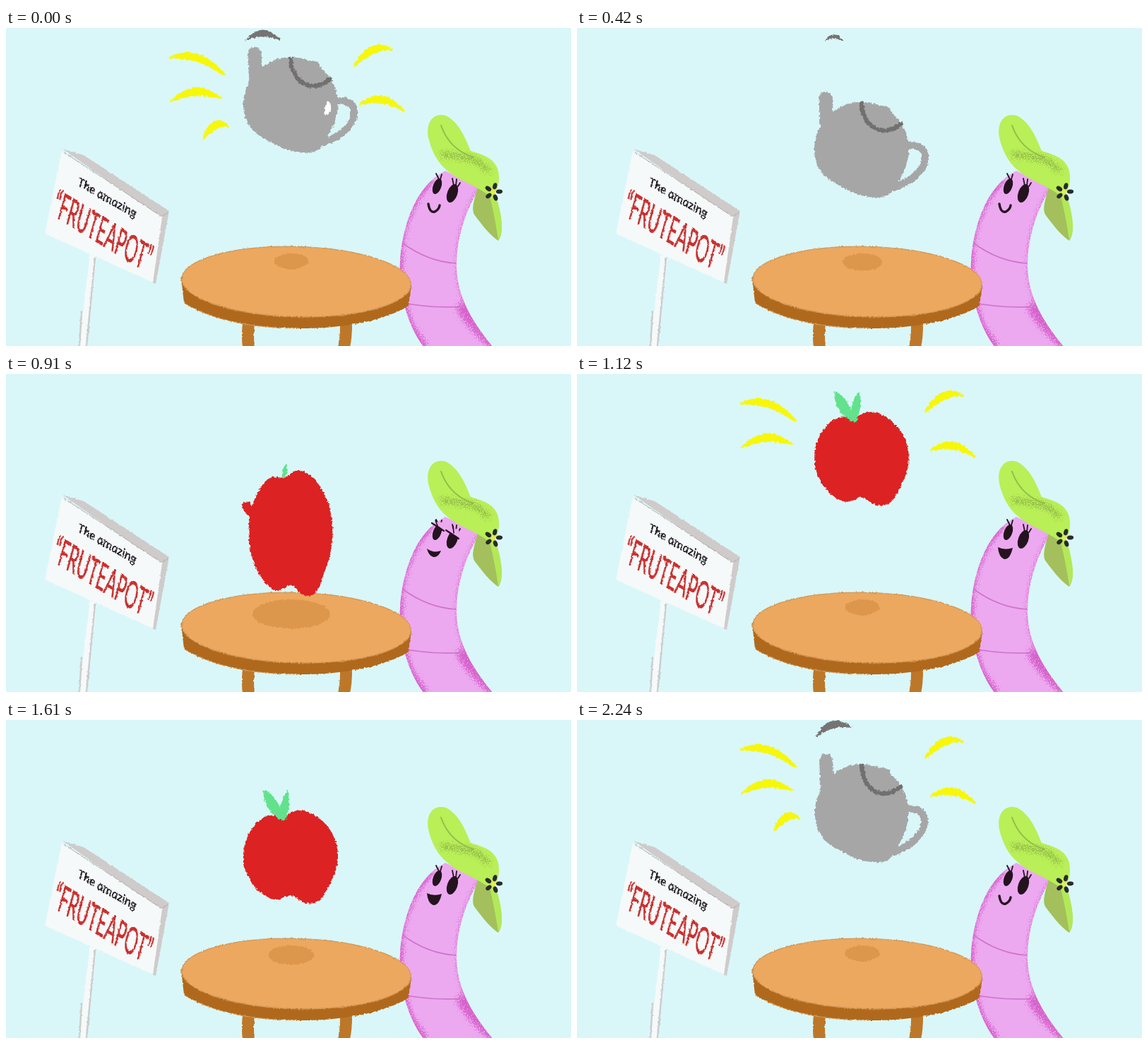
An HTML page that plays this animation: 800 px wide and 450 px high, repeating every 2310 ms.

```html
<!DOCTYPE html>
<html lang="en">
<head>
<meta charset="utf-8">
<title>The amazing Fruteapot</title>
<style>
html, body { margin: 0; width: 100%; height: 100%; overflow: hidden; background: #d9f7f9 }
svg { display: block; width: 100%; height: 100% }
text { font-family: Lato, "Open Sans", sans-serif }
.line { fill: none; stroke-linecap: round; stroke-linejoin: round }
</style>
</head>
<body>
<svg viewBox="0 0 800 450">
<defs>
  <filter id="chalk" x="-10%" y="-10%" width="120%" height="120%" color-interpolation-filters="sRGB">
    <feTurbulence type="fractalNoise" baseFrequency=".3" numOctaves="2" seed="4"/>
    <feDisplacementMap in="SourceGraphic" scale="5" xChannelSelector="R" yChannelSelector="G"/>
  </filter>
  <filter id="pencil" x="-10%" y="-10%" width="120%" height="120%" color-interpolation-filters="sRGB">
    <feTurbulence type="fractalNoise" baseFrequency=".3" numOctaves="2" seed="9"/>
    <feDisplacementMap in="SourceGraphic" scale="3" xChannelSelector="R" yChannelSelector="G"/>
  </filter>
  <!-- speckles that get denser where the blurred source is more opaque -->
  <filter id="grain" x="-30%" y="-30%" width="160%" height="160%" color-interpolation-filters="sRGB">
    <feGaussianBlur in="SourceGraphic" stdDeviation="6" result="soft"/>
    <feTurbulence type="fractalNoise" baseFrequency=".6" numOctaves="2" seed="2"/>
    <feColorMatrix values="0 0 0 0 0  0 0 0 0 0  0 0 0 0 0  2 0 0 0 -.5" result="noise"/>
    <feComposite in="soft" in2="noise" operator="arithmetic" k2="1" k3="1" k4="-1"/>
    <feComponentTransfer result="dots"><feFuncA type="linear" slope="6"/></feComponentTransfer>
    <feComposite in="soft" in2="dots" operator="in"/>
  </filter>
  <path id="worm" d="M622 202C583 222 566 270 560 310C553 355 562 412 592 452H690C655 410 638 375 638 335C638 295 652 255 671 226Z"/>
  <path id="brim" d="M598 155C594 132 606 119 623 124C642 134 650 155 658 174C674 179 690 183 696 199C701 215 696 232 688 240C666 222 640 216 624 201C610 190 602 172 598 155Z"/>
  <clipPath id="inWorm"><use href="#worm"/></clipPath>
  <clipPath id="inBrim"><use href="#brim"/></clipPath>
</defs>

<g id="sign" filter="url(#pencil)">
  <path fill="#f6f9f9" d="M119 320L128 325L115 452H103Z"/>
  <path class="line" stroke="#cbcdcd" stroke-width="2.5" d="M126 326L114 450M107 402L104 450"/>
  <path fill="#cfcbca" d="M80 171L110 180L231 259L212 362L206 359L218 268Z"/>
  <path fill="#f6f9f9" d="M79 174L221 268L208 360L55 291Z"/>
  <path class="line" stroke="#b5b0af" stroke-width="1" d="M82 176L221 267L231 260"/>
  <text transform="matrix(.87 .49 -.15 1 101 223)" font-size="18" font-style="italic" fill="#1c1820" stroke="#1c1820" stroke-width=".4">The amazing</text>
  <text transform="matrix(.46 .28 -.3 1.09 64 264)" font-size="46" fill="#c8302f" stroke="#c8302f" stroke-width=".6">“FRUTEAPOT”</text>
</g>

<use href="#worm" fill="#eca9f0"/>
<g clip-path="url(#inWorm)">
  <g class="line" stroke="#d65fca" filter="url(#grain)">
    <path stroke-width="24" d="M596 215C566 245 551 290 553 330C551 370 560 415 583 455"/>
    <path stroke-width="10" d="M674 226C653 255 640 295 640 335C640 370 657 410 694 452"/>
    <path stroke-width="16" d="M562 400Q572 425 592 450M642 396Q660 425 690 450"/>
  </g>
  <path class="line" stroke="#d173cd" stroke-width="1.6" d="M561 304C580 318 605 331 637 333M558 388C590 395 620 396 652 394"/>
</g>

<path fill="#a3c05c" d="M668 226C662 245 659 256 663 264C675 280 686 294 697 301C705 290 703 270 690 236Z"/>
<path fill="#b3e858" d="M684 234C690 258 694 280 697 300C706 288 702 262 692 232Z"/>
<use href="#brim" fill="#b9ef57"/>
<g clip-path="url(#inBrim)">
  <path class="line" stroke="#7fa043" stroke-width="12" opacity=".75" filter="url(#grain)" d="M616 178Q645 182 664 186L684 202"/>
  <path class="line" stroke="#94bd49" stroke-width="2" d="M616 138Q628 172 662 183"/>
</g>
<g id="flower" fill="#2a2a2c"></g>
<circle cx="690" cy="232" r="3" fill="#e8e85a"/>

<g fill="#24131f" stroke="#24131f" stroke-width="0">
  <ellipse cx="610.5" cy="224" rx="5.8" ry="11.5" transform="rotate(20 610.5 224)"/>
  <ellipse cx="632" cy="234" rx="7.2" ry="13.5" transform="rotate(20 632 234)"/>
  <path class="line" stroke-width="1.8" d="M613 214L609 206M615 214L617 207M634 223L632 213M637 223L638 214M640 224L643 219"/>
  <path id="smile" class="line" stroke-width="3.4" d="M598 249Q600 262 607 260Q613 257 614 251"/>
  <g id="smirk">
    <path fill="#eca9f0" d="M604 209L621 222L622 210ZM623 220L643 233L641 219Z"/>
    <path class="line" stroke-width="2.2" d="M603 211L620 222M623 221L641 233"/>
    <path class="line" stroke-width="1.6" d="M611 215L608 207M634 225L633 215"/>
    <path d="M596 247Q605 254 616 250Q612 260 605 259Q598 257 596 247Z"/>
  </g>
  <path id="laugh" d="M596 245Q606 250 617 246Q613 263 605 262Q597 259 596 245Z"/>
</g>

<g id="table" filter="url(#pencil)">
  <path class="line" stroke="#bd7729" stroke-width="17" d="M344 414Q341 434 344 458M481 414Q483 434 477 458"/>
  <path fill="#b0691c" d="M248 353L252 389C288 412 345 425 415 425C485 425 540 412 570 393L574 364Z"/>
  <path class="line" stroke="#d7a468" stroke-width="1" d="M252 389C288 412 345 425 415 425"/>
  <ellipse cx="411" cy="359" rx="162" ry="49.5" transform="rotate(1.5 411 359)" fill="#eda860" stroke="#d59a58" stroke-width="1.5"/>
</g>

<g filter="url(#chalk)">
  <ellipse id="shadow" cx="404" fill="#dd974c"/>
</g>
<g filter="url(#chalk)">
  <path id="rays" fill="#f7f70a" stroke="#f7f70a" stroke-width="2.5"/>
  <path id="steam" fill="#777373" stroke="#777373" stroke-width="1.5"/>
  <path id="handle" class="line" stroke-width="10"/>
  <path id="spout" class="line"/>
  <path id="body"/>
  <path id="lid" class="line" stroke="#726f6f" stroke-width="6"/>
  <path id="shine" fill="#fff"/>
  <path id="leaf" fill="#62e28c" d="M0 11Q-28 0 -29 -32Q-8 -28 0 11Z"/>
  <path id="stem" fill="#62e28c" d="M-8 9Q-4 -22 6 -32Q12 -12 2 11Z"/>
</g>
</svg>

<script>
const STEP = 70, FRAMES = 33, HALF = FRAMES / 2, R = 67, CX = 403;
const RAYS = [[-163, 82], [177, 72], [-24, 60], [8, 64], [153, 42]]; // angle, length
const $ = id => document.getElementById(id);
const set = (id, attrs) => { for (const k in attrs) $(id).setAttribute(k, attrs[k]); };
const clamp = v => Math.max(0, Math.min(1, v));
const ramp = (v, from, to) => clamp((v - from) / (to - from));
const mix = (a, b, t) => a + (b - a) * t;
const bump = (deg, at, width) => Math.exp(-(((deg - at) / width) ** 2));
const polar = (deg, r) => [r * Math.cos(deg * Math.PI / 180), r * Math.sin(deg * Math.PI / 180)];

// Pot: flat base and a knob. Apple: a dip above and below
function radius(deg, ripe) {
  const potPart = 4 * bump(deg, -58, 6) - 7 * bump(deg, 118, 26);
  const applePart = -9 * bump(deg, -100, 15) - 12 * bump(deg, 90, 14);
  return R + 8 * bump(deg, 60, 18) + mix(potPart, applePart, ripe);
}

// Pointed crescent along the part s..e of a quadratic curve
function crescent(p0, p1, p2, s, e, w) {
  if (e - s < .02) return '';
  const at = (u, v) => [0, 1].map(k => mix(mix(p0[k], p1[k], u), mix(p1[k], p2[k], u), v));
  const a = at(s, s), c = at(s, e), b = at(e, e);
  const len = Math.hypot(b[0] - a[0], b[1] - a[1]);
  const nx = (a[1] - b[1]) / len * w, ny = (b[0] - a[0]) / len * w;
  return `M${a}Q${c[0] + nx} ${c[1] + ny} ${b}Q${c[0] - nx} ${c[1] - ny} ${a}Z`;
}

function ray([deg, length], s, e) {
  const at = r => { const [x, y] = polar(deg, r); return [CX + x, 95 + y]; };
  const mid = at(98 + length / 2);
  return crescent(at(98 + length), [mid[0], mid[1] - 24], at(98), s, e, 9);
}

$('flower').innerHTML = [0, 1, 2, 3, 4].map(k =>
  `<ellipse cx="690" cy="223.5" rx="3" ry="4.6" transform="rotate(${k * 72 + 15} 690 232)"/>`).join('');

function draw(f) {
  // two jumps per loop; p counts from just before the top of each
  let p = f % HALF;
  if (p > 13) p -= HALF;
  const isApple = f > 10 && f < 26;

  const ripe = ramp(f, 8, 10.6) - ramp(f, 26, 29.6);
  const spout = 1 - ramp(f, 8, 14) + ramp(f, 25, 28);
  const handle = 1 - ramp(f, 8, 11) + ramp(f, 26.5, 30);
  const lid = 1 - ramp(f, 7, 9) + ramp(f, 28, 30);
  const stem = ramp(f, 11, 15) - ramp(f, 23, 25.5);

  // squash on landing, stretch on leaving, gravity between
  const sy = 1 - .4 * ramp(p, 7, 9) + .75 * ramp(p, 10.5, 13) + .03 * Math.min(p, 0) ** 2;
  const sx = sy ** -.4;
  const ground = 354 - 10 * Math.max(0, p - 9);
  const cy = Math.min(91 + 4.8 * (p - 1.9) ** 2, ground - R * sy);
  const at = (x, y) => [CX + x * sx, cy + y * sy];

  const fade = mix(166, 34, ripe);
  const color = `rgb(${mix(166, 220, clamp(ripe * 2.5))},${fade},${fade})`;

  const outline = [];
  for (let deg = -180; deg < 180; deg += 4) outline.push(at(...polar(deg, radius(deg, ripe))));
  set('body', { d: `M${outline.join('L')}Z`, fill: color });

  const droop = 6 * spout * (1 - spout) ** 2;
  set('spout', {
    d: `M${at(-48, -8)}L${at(-51 - 28 * droop, -18 - 54 * spout)}`,
    stroke: color, 'stroke-width': 12 + 7 * spout
  });
  set('handle', {
    d: `M${at(62, -4)}C${at(62 + 38 * handle, -14)} ${at(60 + 44 * handle, 34)} ${at(46, 54)}`,
    stroke: color, visibility: handle > 0 ? 'visible' : 'hidden'
  });
  set('lid', { d: `M${at(0, -65)}C${at(1, -34)} ${at(28, -13)} ${at(56, -36)}`, opacity: lid });

  const [lx, ly] = at(-10, -61);
  set('stem', { transform: `translate(${lx} ${ly}) scale(${stem})` });
  set('leaf', { transform: `translate(${lx} ${ly}) scale(${clamp(stem * 2 - 1)})` });

  const glint = isApple ? [at(1, -60), at(36, -60), at(45, -26)] : [at(35, -50), at(64, -28), at(50, 16)];
  const shines = p >= 0 && p <= 6;
  set('shine', { d: shines ? crescent(...glint, clamp(.75 - p / 4), clamp(1 - (p - 3) * .35), 9) : '' });

  const [s, e] = p < 0 ? [1 - clamp(p + 2.2), 1] : [0, clamp(1 - p * .17)];
  set('rays', { d: RAYS.slice(0, isApple ? 4 : 5).map(r => ray(r, s, e)).join('') });

  // the puff rocks and shrinks
  const half = 24 - 2 * p;
  set('steam', {
    d: !isApple && p >= -2 && p <= 9 ? crescent([-half, 0], [0, -half * .8], [half, 0], 0, 1, half * .35) : '',
    transform: `translate(364 17) rotate(${30 * Math.sin(p * Math.PI / 6)})`
  });

  const near = Math.max(0, (cy + R * sy - 160) / 190) ** 3;
  set('shadow', { cy: 330 + 18 * near, rx: 24 + 58 * near, ry: 11 + 18 * near });

  const mood = f > 10 && f < 15 ? 'smirk' : f > 14 && f < 25 ? 'laugh' : 'smile';
  for (const m of ['smile', 'smirk', 'laugh']) set(m, { visibility: m === mood ? 'visible' : 'hidden' });
}

let last = -1;
function tick() {
  const f = Math.floor(performance.now() / STEP) % FRAMES;
  if (f !== last) draw(last = f);
  requestAnimationFrame(tick);
}
tick();
</script>
</body>
</html>
```
